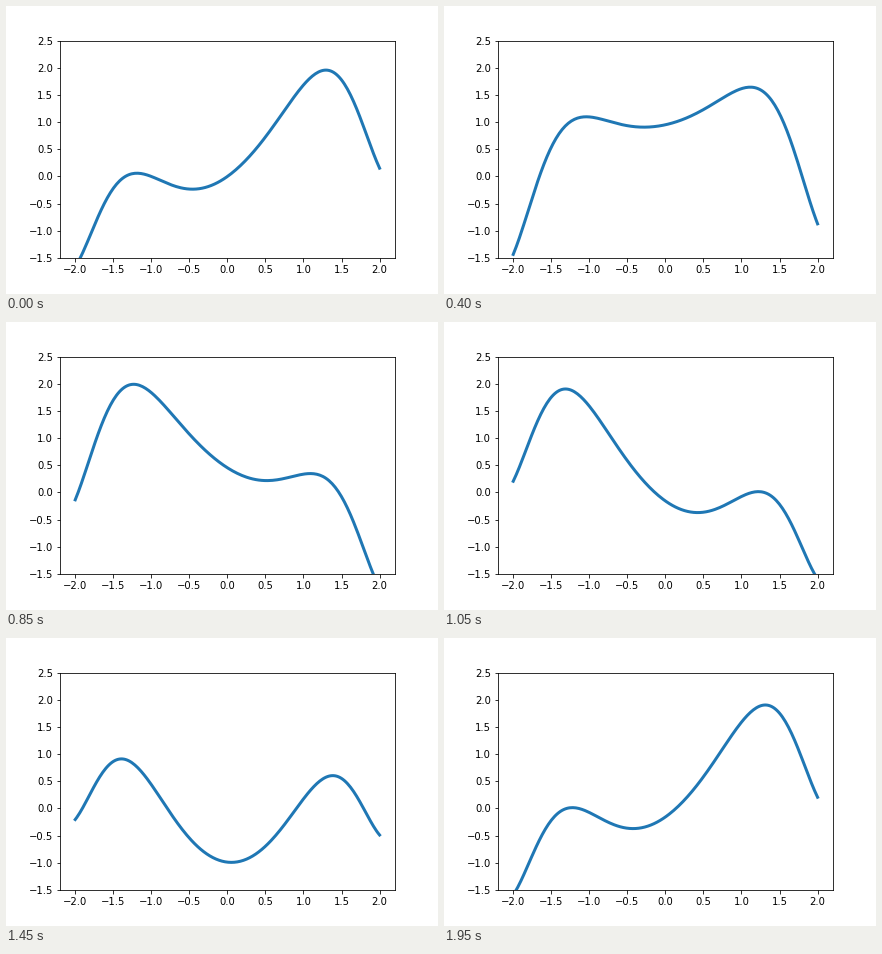
A matplotlib script that plays this animation: 432x288 px, repeating every 2000 ms.

```python
import numpy as np
import matplotlib.pyplot as plt
from matplotlib.animation import FuncAnimation

FRAMES = 40
INTERVAL = 50

plt.rcParams["font.family"] = "DejaVu Sans"
plt.rcParams["font.size"] = 10

fig, ax = plt.subplots(figsize=(6, 4), dpi=72, facecolor="white")
fig.subplots_adjust(left=0.125, right=0.9, bottom=0.125, top=0.88)
ax.set_xlim(-2.2, 2.2)
ax.set_ylim(-1.5, 2.5)
ax.set_xticks(np.arange(-2, 2.1, 0.5))
ax.set_yticks(np.arange(-1.5, 2.6, 0.5))

x = np.linspace(-2, 2, 200)
(line,) = ax.plot(x, np.sin(x**2) + np.sin(x), color="#1f77b4", lw=3)


def update(i):
    phase = 2 * np.pi * i / FRAMES
    line.set_ydata(np.sin(x**2) + np.sin(x + phase))
    return (line,)


anim = FuncAnimation(fig, update, frames=FRAMES, interval=INTERVAL,
                     repeat=True, repeat_delay=0)
plt.show()
```
